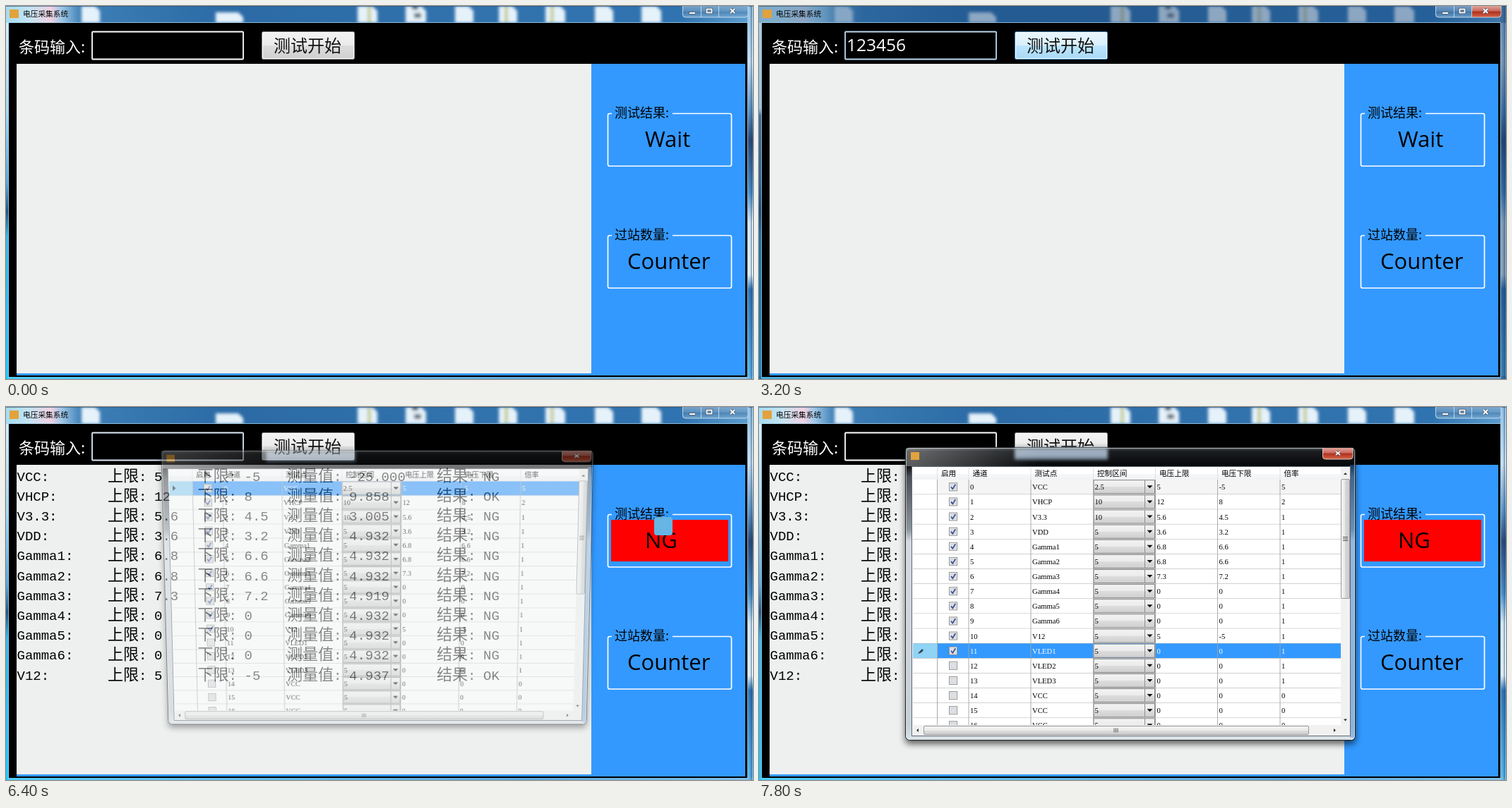
Recreate the animation shown at these times as an HTML page. Size 1058x529 px, loop 8 s.

```html
<!DOCTYPE html>
<html lang="zh-CN">
<head>
<meta charset="utf-8">
<title>电压采集系统</title>
<style>
html, body { margin: 0; width: 100%; height: 100%; overflow: hidden; background: #000; }
svg { position: absolute; left: 0; top: 0; width: 1058px; height: 529px; display: block; }
#dialog { transform-origin: 526px 265px; }
text { white-space: pre; }
.cjk { font-family: "Noto Sans CJK SC", "Noto Sans CJK", "Noto Sans CJK JP", sans-serif; }
.ui { font-family: "Open Sans", "Noto Sans", sans-serif; }
.mono { font-family: "Liberation Mono", "Noto Sans CJK SC", monospace; }
.cell { font-family: "Liberation Serif", "Noto Serif", serif; }
</style>
</head>
<body>
<svg id="main" viewBox="0 0 1058 529"></svg>
<svg id="dialog" viewBox="0 0 1058 529"></svg>
<script>
const main = document.getElementById('main');
const dialog = document.getElementById('dialog');

function el(parent, tag, attrs = {}, content) {
  const node = document.createElementNS('http://www.w3.org/2000/svg', tag);
  for (const k in attrs) node.setAttribute(k, attrs[k]);
  if (content !== undefined) node.textContent = content;
  return parent.appendChild(node);
}
const rect = (p, x, y, width, height, fill, more) => el(p, 'rect', { x, y, width, height, fill, ...more });
const path = (p, d, stroke, width = 1, more) => el(p, 'path', { d, fill: 'none', stroke, 'stroke-width': width, ...more });
const shape = (p, d, fill) => el(p, 'path', { d, fill });
const label = (p, x, y, size, cls, str, fill = '#000', more) =>
  el(p, 'text', { x, y, 'font-size': size, class: cls, fill, ...more }, str);

// stops: "offset colour [opacity]" separated by commas
function gradient(p, id, stops, horizontal) {
  const g = el(p, 'linearGradient', { id, x2: horizontal ? 1 : 0, y2: horizontal ? 0 : 1 });
  for (const s of stops.split(',')) {
    const [offset, color, opacity = 1] = s.trim().split(' ');
    el(g, 'stop', { offset, 'stop-color': color, 'stop-opacity': opacity });
  }
  return `url(#${id})`;
}
const show = (node, on) => node.setAttribute('opacity', Number(on));
const clamp = v => Math.max(0, Math.min(1, v));
const ramp = (t, a, b) => clamp((t - a) / (b - a));

const defs = el(main, 'defs');
const blur = el(defs, 'filter', { id: 'soft', x: '-30%', y: '-30%', width: '160%', height: '160%' });
el(blur, 'feGaussianBlur', { stdDeviation: 2 });
const closeRed = gradient(defs, 'closeRed', '0 #dfa49a, .45 #c9685c, .5 #ad2f1d, 1 #d4674a');
const pale = gradient(defs, 'pale', '0 #f3f3f3, .5 #ebebeb, .5 #dddddd, 1 #cfcfcf');
const hoverBlue = gradient(defs, 'hoverBlue', '0 #eaf6fd, .5 #d9f0fc, .5 #bee6fd, 1 #a7d9f5');
const pressBlue = gradient(defs, 'pressBlue', '0 #e5f4fc, .5 #c4e5f6, .5 #98d1ef, 1 #68b3db');

// ---- desktop seen through the window frame
rect(main, 0, 0, 1058, 529, '#2b6ba6');
rect(main, 0, 0, 1058, 24, gradient(defs, 'sky',
  '0 #a5dcf2, .03 #c3e4f2, .06 #f0d2e2, .075 #9cc6e6, .1 #3e7fb6, .3 #2b6aa5, .6 #3272ac, .9 #2f73b0, 1 #5f9fd0', true));
const icons = el(main, 'g', { filter: 'url(#soft)' });
for (const [x, w, top] of [[107, 26, 0], [297, 39, 9], [498, 28, 0], [566, 29, 0], [636, 26, 0],
  [698, 26, 0], [764, 28, 0], [834, 26, 0], [900, 28, 0]])
  shape(icons, `M${x} ${top}h${w - 7}l7 7V24H${x}z`, '#e6f2fa');
for (const x of [512, 706, 771]) rect(icons, x, 0, 5, 24, '#c9cf9a');
rect(icons, 575, 0, 9, 5, '#4b5560');
rect(icons, 578, 10, 10, 7, '#6c7680');
rect(main, 0, 24, 4, 505, gradient(defs, 'left',
  '0 #d5ecf8, .25 #a4d6f0, .45 #5aa6d8, .53 #24547f, .6 #36b4ea, 1 #20c8ff'));
rect(main, 1050, 0, 8, 529, gradient(defs, 'right',
  '0 #8fc0e4, .15 #c6def0, .28 #5d93c4, .36 #2b4a78, .5 #4a8fca, .58 #d2e6f4, .72 #dcecf6, .76 #2f74b4, 1 #58b4ea'));
rect(main, 0, 525, 1058, 4, gradient(defs, 'bottom', '0 #20c8ff, .3 #45b4ea, .7 #3c94d4, 1 #6cb6e4', true));

const glass = el(main, 'g');
rect(glass, 0, 0, 1058, 24, gradient(defs, 'glassTop',
  '0 #6f9cbe .75, .09 #5f8fb6 .7, .14 #1c4f86 .45, .5 #153f70 .42, 1 #1b4a80 .45', true));
rect(glass, 0, 24, 4, 505, gradient(defs, 'glassLeft', '0 #88a8c0 .5, .24 #88a8c0 .5, .26 #123a66 .68, 1 #17558c .6'));
rect(glass, 1050, 0, 8, 529, '#153f70', { 'fill-opacity': .45 });
rect(glass, 0, 525, 1058, 4, '#153f70', { 'fill-opacity': .35 });

path(main, 'M3.5 527V23.5H1050.5V527.5H3', '#a9d4ee', 1, { 'stroke-opacity': .75 });
path(main, 'M1055.5 0V529', '#163a60', 1, { 'stroke-opacity': .6 });
path(main, 'M0 .5H1058', '#234a70', 1, { 'stroke-opacity': .6 });

rect(main, 5, 5, 13, 12, '#e2a23c');
label(main, 24, 15, 10.7, 'cjk', '电压采集系统', '#000');

// ---- window buttons
shape(main, 'M958 0H1051V12q0 4-4 4H962q-4 0-4-4z', gradient(defs, 'caps', '0 #8fb2d0 .75, .5 #6d98c0 .6, .5 #4a7cab .6, 1 #84b2d6 .7'));
const redCap = shape(main, 'M1009 0H1051V12q0 4-4 4H1009z', closeRed);
path(main, 'M958.5 0V12q0 4 4 4H1047q4 0 4-4V0M984.5 0V16M1009.5 0V16', '#d4e6f4', 1, { 'stroke-opacity': .8 });
rect(main, 967.5, 8.5, 9, 3, '#fff', { stroke: '#42566c', 'stroke-width': .8 });
rect(main, 992.5, 4.5, 7, 5, 'none', { stroke: '#42566c', 'stroke-width': 3.4 });
rect(main, 992.5, 4.5, 7, 5, 'none', { stroke: '#fff', 'stroke-width': 1.8 });
path(main, 'M1026 4l6 6m0-6l-6 6', '#42566c', 3.6);
path(main, 'M1026 4l6 6m0-6l-6 6', '#fff', 2);

// ---- client area
rect(main, 4, 24, 1046, 502, '#000');
rect(main, 15, 82, 1032, 442, '#3399ff');
rect(main, 15, 82, 814, 439, '#eef0ef');
label(main, 18, 66, 22, 'cjk', '条码输入:', '#fff');
const box = rect(main, 122, 36.5, 214, 39, '#000', { rx: 1, stroke: '#fff', 'stroke-width': 1.8 });
const typed = label(main, 124, 64, 24.5, 'ui', '', '#fff');
const caret = rect(main, 123, 38, 1, 34, '#fff');

const button = rect(main, 362.5, 36.5, 131, 39, pale, { rx: 2, stroke: '#8a8a8a' });
const buttonRing = rect(main, 363.5, 37.5, 129, 37, 'none', { rx: 1.5, stroke: '#fcfcfc' });
label(main, 379, 65, 24, 'cjk', '测试开始', '#111', { 'font-weight': 300 });

function groupBox(y, title) {
  path(main, `M858 ${y}H855q-2.5 0-2.5 2.5V${y + 72}q0 2.5 2.5 2.5H1025q2.5 0 2.5-2.5V${y + 2.5}q0-2.5-2.5-2.5H944`, '#fff', 1.7);
  label(main, 862, y + 5, 18, 'cjk', title, '#000', { 'font-weight': 500 });
}
groupBox(152.5, '测试结果:');
groupBox(325.5, '过站数量:');
const alarm = rect(main, 857, 160, 166, 59, '#f00');
const verdict = label(main, 905, 200, 31, 'ui', '');
label(main, 880, 373, 31, 'ui', 'Counter');

// ---- channels: name, range, upper, lower, rate, measured, result
const channels = `VCC 2.5 5 -5 5 -25.000 NG
VHCP 10 12 8 2 9.858 OK
V3.3 10 5.6 4.5 1 3.005 NG
VDD 5 3.6 3.2 1 4.932 NG
Gamma1 5 6.8 6.6 1 4.932 NG
Gamma2 5 6.8 6.6 1 4.932 NG
Gamma3 5 7.3 7.2 1 4.919 NG
Gamma4 5 0 0 1 4.932 NG
Gamma5 5 0 0 1 4.932 NG
Gamma6 5 0 0 1 4.932 NG
V12 5 5 -5 1 4.937 OK
VLED1 5 0 0 1
VLED2 5 0 0 1
VLED3 5 0 0 1
VCC 5 0 0 0
VCC 5 0 0 0
VCC 5 0 0 0`.split('\n').map(line => line.split(' '));

const results = el(main, 'g', { 'font-weight': 500 });
channels.slice(0, 11).forEach(([name, , upper, lower, , value, result], i) => {
  const y = 104.5 + i * 28.2;
  const mono = (x, s) => label(results, x, y, 19, 'mono', s);
  const pair = (x, head, s) => {
    const end = x + head.length * 22;
    label(results, x, y, 22, 'cjk', head);
    mono(end, ':');
    mono(end + 22, s);
  };
  mono(15.5, name + ':');
  pair(144, '上限', upper);
  pair(271.5, '下限', lower);
  pair(398, '测量值', value);
  pair(610, '结果', result);
});

const imeBadge = rect(main, 918, 156, 26, 26, '#66b5e3', { rx: 4 });

// ---- settings dialog
const dd = el(dialog, 'defs');
const shadow = el(dd, 'filter', { id: 'shadow', x: '-10%', y: '-10%', width: '120%', height: '120%' });
el(shadow, 'feGaussianBlur', { stdDeviation: 5 });
const clip = el(dd, 'clipPath', { id: 'gridClip' });
rect(clip, 218, 86, 606, 365);
rect(dialog, 207, 60, 638, 418, '#000', { rx: 6, opacity: .6, filter: 'url(#shadow)' });
rect(dialog, 207.5, 57.5, 637, 415, gradient(dd, 'frame',
  '0 #5a5e62, .012 #1b1d20, .06 #08090b, .1 #4b5056, .28 #8d959b, .32 #d4dade, .95 #c8d0d5, 1 #dde4e8'),
  { rx: 6, stroke: '#1c2024' });
rect(dialog, 837, 82, 7, 387, '#2f86dc', { opacity: .4 });
rect(dialog, 362, 58, 132, 17, gradient(dd, 'ghost', '0 #a9b9c8 .9, .6 #b6cbe0 .85, 1 #9db6cf .6'), { filter: 'url(#soft)' });
rect(dialog, 208, 58, 190, 26, gradient(dd, 'sheen', '0 #fff .35, 1 #fff 0', true));
rect(dialog, 208.5, 58.5, 635, 413, 'none', { rx: 5, stroke: '#e8f0f6', 'stroke-opacity': .6 });
rect(dialog, 215, 64, 12, 11, '#e2a23c');
shape(dialog, 'M798 58H841V70q0 4-4 4H802q-4 0-4-4z', closeRed);
path(dialog, 'M798.5 58V70q0 4 4 4H837q4 0 4-4V58', '#e7c3bb', 1);
path(dialog, 'M817 63l6 5m0-5l-6 5', '#5b2620', 3.4);
path(dialog, 'M817 63l6 5m0-5l-6 5', '#fff', 2);
rect(dialog, 216.5, 84.5, 621, 382, '#fff', { stroke: '#5c6a76' });

const grid = el(dialog, 'g', { 'clip-path': 'url(#gridClip)' });
const columns = [252.5, 297, 385, 473.5, 561.5, 649.5, 738];
rect(grid, 218, 86, 606, 17, gradient(dd, 'head', '0 #fff, .5 #fff, .5 #f7f8fa, 1 #f1f2f4'));
['启用', '通道', '测试点', '控制区间', '电压上限', '电压下限', '倍率'].forEach((s, i) => {
  label(grid, columns[i] + 5.5, 97.5, 10.6, 'cjk', s);
  path(grid, `M${columns[i]} 86V103`, '#dfe1e4');
});

const rowH = 21.13;
const rows = channels.map(([name, range, upper, lower, rate], i) => {
  const top = 103 + i * rowH, mid = top + rowH / 2 - .3, base = mid + 4;
  const header = rect(grid, 218, top, 34, rowH, '#fff');
  const back = rect(grid, 253, top, 571, rowH, '#fff');
  const texts = [[1, i], [2, name], [4, upper], [5, lower], [6, rate]]
    .map(([c, s]) => label(grid, columns[c] + 2, base, 10.6, 'cell', s));
  path(grid, `M218 ${top + rowH}H824`, '#a3a3a3', .9);
  const check = rect(grid, 269.5, mid - 5.5, 11, 11, '#f3f4f5', { stroke: '#8e8f8f' });
  rect(grid, 271.5, mid - 3.5, 7, 7, '#dde1e6', { stroke: '#c3c8ce', 'stroke-width': .7 });
  const tick = path(grid, `M272 ${mid}l2.3 3 4-6.5`, '#3f5694', 1.8);
  rect(grid, 474, top + .7, 86.5, rowH - 2, pale, { stroke: '#777', 'stroke-width': .9 });
  path(grid, `M546.5 ${top + 1}v${rowH - 3}`, '#8c8c8c');
  shape(grid, `M549.5 ${mid - 2}h8l-4 4z`, '#111');
  label(grid, 475.5, base, 10.6, 'cell', range);
  return { header, back, texts, check, tick, mid };
});
for (const x of columns) path(grid, `M${x} 103V451`, '#a3a3a3', .9);
const pointer = shape(grid, `M223 ${rows[0].mid - 4}l4.5 4-4.5 4z`, '#123');
const pencil = path(grid, `M226 ${rows[11].mid + 4}l1.5-2 4-4m-3 5l4-4`, '#222', 1.2);

rect(dialog, 824, 86, 13, 365, '#f1f1f1');
rect(dialog, 218, 451, 619, 15, '#f1f1f1');
rect(dialog, 824.5, 102.5, 12, 169, gradient(dd, 'thumbV', '0 #f6f6f6, .5 #e6e6e6, .5 #d6d6d8, 1 #cacacc', true), { rx: 1.5, stroke: '#999' });
rect(dialog, 233.5, 452.5, 545, 12, pale, { rx: 1.5, stroke: '#999' });
path(dialog, 'M827 184.5h7m-7 2.5h7m-7 2.5h7M503 455.500v6m2.500-6v6m2.500-6v6', '#555');
shape(dialog, 'M828 96l2.500-3 2.500 3zM828 442.500l2.500 3 2.500-3zM226 456l-3 2.500 3 2.500zM814 456l3 2.500-3 2.500z', '#333');

// ---- animation
const keyTimes = [1800, 1900, 2000, 2200, 2300, 2400];
const within = (t, ...spans) => spans.some(([a, b]) => t >= a && t < b);

function focusLevel(t) {
  if (t < 3400) return ramp(t, 300, 700);
  if (t < 4700) return 1 - ramp(t, 3300, 3700);
  if (t < 6100) return ramp(t, 4600, 4900);
  return 1 - ramp(t, 6200, 6600);
}

function drawButton(t) {
  const hover = within(t, [3200, 3400]), pressed = within(t, [3400, 3700]);
  const focused = within(t, [3700, 4800]);
  button.setAttribute('fill', pressed ? pressBlue : hover ? hoverBlue : pale);
  button.setAttribute('stroke', pressed ? '#2c628b' : hover || focused ? '#3c7fb1' : '#8a8a8a');
  buttonRing.setAttribute('stroke', focused ? '#48c8f0' : pressed ? '#9ec8e0' : '#fcfcfc');
}

function drawDialog(t) {
  dialog.style.visibility = t < 6400 ? 'hidden' : 'visible';
  const left = t < 6500 ? 1 : t < 6600 ? .3 : 0;
  dialog.style.opacity = 1 - .46 * left;
  dialog.style.transform = left
    ? `translateY(${-6 * left}px) perspective(1620px) rotateX(${-8 * left}deg) scale(${1 - .055 * left})` : 'none';
  const selected = t < 7500 ? 0 : 11;
  rows.forEach((row, i) => {
    const on = i === selected;
    row.header.setAttribute('fill', on ? '#8fd3f5' : '#fff');
    row.back.setAttribute('fill', on ? '#3399ff' : i ? '#fff' : '#f5f5f5');
    for (const s of row.texts) s.setAttribute('fill', on ? '#fff' : '#000');
    show(row.tick, i < 11 || (i === 11 && t >= 7800));
  });
  rows[11].check.setAttribute('fill', within(t, [7300, 7800]) ? '#c9e6f8' : '#f3f4f5');
  rows[11].check.setAttribute('stroke', within(t, [7300, 7800]) ? '#3c7fb1' : '#8e8f8f');
  pointer.setAttribute('transform', `translate(0 ${selected * rowH})`);
  show(pointer, t < 7600);
  show(pencil, t >= 7600);
}

function render(t) {
  const active = t < 6100 ? 1 - (1 - ramp(t, 300, 900)) ** 2 : 0;
  show(glass, active);
  show(redCap, active);

  const focus = focusLevel(t);
  box.setAttribute('stroke', `rgb(${255 - 69 * focus},${255 - 40 * focus},${255 - 15 * focus})`);
  const count = t < 4700 ? keyTimes.filter(k => t >= k).length : 0;
  typed.textContent = '123456'.slice(0, count);
  caret.setAttribute('x', count ? 124 + count * 14 : 123);
  show(caret, within(t, [800, 1300], [1800, 2900], [4700, 5200], [5700, 6100]));
  drawButton(t);

  const done = t >= 4700;
  show(results, done);
  show(alarm, done);
  verdict.textContent = done ? 'NG' : t < 4500 ? 'Wait' : 'Wai';
  show(imeBadge, t < 6400 || t >= 7500 ? 0 : t < 7000 ? 1 : t < 7300 ? .66 : .33);
  drawDialog(t);
}

const start = performance.now();
function tick() {
  const t = (performance.now() - start) % 8000;
  render(Math.floor(t / 100) * 100);
  requestAnimationFrame(tick);
}
tick();
</script>
</body>
</html>
```
